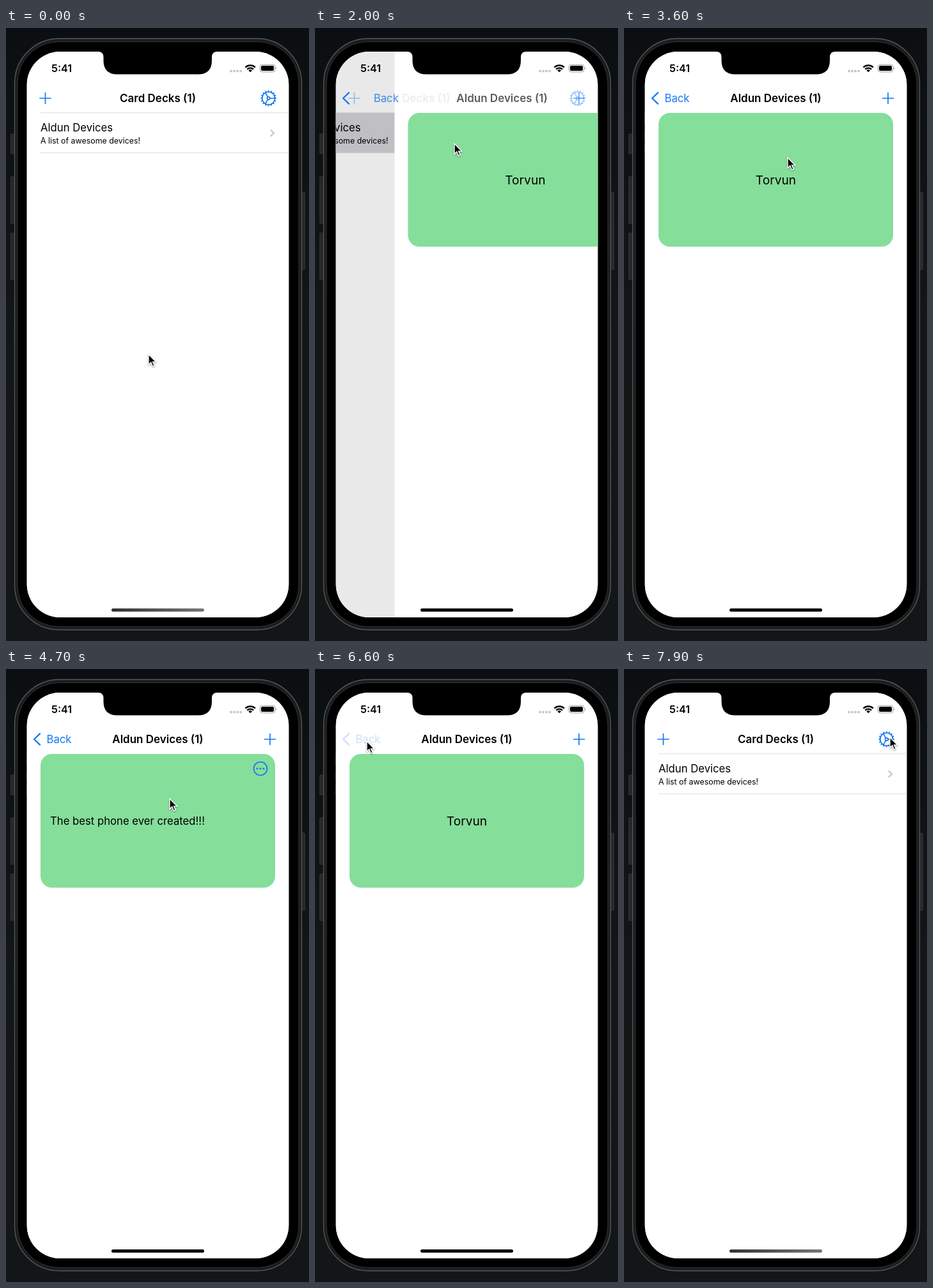
These frames come from a looping animation (474 by 960 pixels, 8000 ms). An HTML page:

```html
<!DOCTYPE html>
<html lang="en">
<head>
<meta charset="utf-8">
<title>Card decks</title>
<style>
html, body { margin: 0; width: 100%; height: 100%; overflow: hidden; background: #0d1012; }
#stage { position: relative; width: 474px; height: 960px; overflow: hidden; font: 16.7px Inter, "Liberation Sans", sans-serif; }
#stage div, #stage svg { position: absolute; left: 0; top: 0; }
svg { overflow: visible; }
.screen { width: 474px; height: 960px; background: #fff; clip-path: inset(37px 31.7px 37px 32.7px round 52px); }
#detail { left: 0; width: 474px; height: 960px; }
#detail::before { content: ""; position: absolute; left: 32.7px; width: 410px; height: 960px; background: #fff; }
#stage #card { left: 54px; top: 133px; }
.bold { font-weight: 600; font-size: 17px; }
.mid { text-anchor: middle; }
.blue { fill: none; stroke: #1578f3; stroke-width: 1.7; stroke-linecap: round; stroke-linejoin: round; }
.tint { fill: #1578f3; }
</style>
</head>
<body>
<div id="stage">
  <svg width="474" height="960">
    <defs>
      <linearGradient id="wall" x2="0" y2="1">
        <stop stop-color="#0b0f11"/><stop offset=".5" stop-color="#131617"/><stop offset="1" stop-color="#121617"/>
      </linearGradient>
      <linearGradient id="bar"><stop stop-color="#333"/><stop offset="1" stop-color="#777"/></linearGradient>
    </defs>
    <rect width="474" height="960" fill="url(#wall)"/>
    <g fill="#25282a" stroke="#383b3c" stroke-width=".8">
      <rect x="7.5" y="166" width="7" height="31" rx="1"/>
      <rect x="7.5" y="233" width="7" height="73" rx="1"/>
      <rect x="7.5" y="321" width="7" height="73" rx="1"/>
      <rect x="461" y="257" width="6.5" height="121" rx="1"/>
    </g>
    <rect x="13.5" y="16.5" width="449" height="926" rx="70" fill="#1b1c1d" stroke="#565859" stroke-width="1.3"/>
    <rect x="18" y="21.5" width="440" height="916" rx="65" fill="#000" stroke="#303233"/>
  </svg>

  <div class="screen">
    <svg id="list" width="474" height="960">
      <rect x="32" width="411" height="960" fill="#fff"/>
      <rect id="row" x="32" y="133" width="411" height="62.5" fill="#d1d1d6"/>
      <path d="M54 132.8H443M54 195.4H443" stroke="#dcdcde"/>
      <text x="54" y="161.5">Aldun Devices</text>
      <text x="54" y="181" font-size="12.4">A list of awesome devices!</text>
      <path d="M413.8 159.3l5.2 5.2-5.2 5.2" fill="none" stroke="#c3c3c6" stroke-width="2"/>
      <rect id="dim" x="32" width="540" height="960"/>
    </svg>

    <div id="detail">
      <svg id="card" width="367" height="209.5">
        <rect id="face" width="367" height="209.5" rx="18"/>
        <text id="front" class="mid" x="183.5" y="112" font-size="19.2">Torvun</text>
        <g id="back">
          <text x="15" y="111">The best phone ever created!!!</text>
          <circle cx="344" cy="23" r="10.5" class="blue"/>
          <g class="tint"><circle cx="339" cy="23" r="1.5"/><circle cx="344" cy="23" r="1.5"/><circle cx="349" cy="23" r="1.5"/></g>
        </g>
      </svg>
    </div>

    <svg width="474" height="960">
      <g id="oldIcons" class="blue">
        <path d="M53 110h17M61.5 101.5v17"/>
        <g id="gear" transform="translate(410.7 110)">
          <circle r="10"/><circle r="2.2"/>
        </g>
      </g>
      <text id="oldTitle" class="bold mid" x="237.5" y="116">Card Decks (1)</text>
      <path id="chevron" class="blue" d="M53 101.3l-9 8.7 9 8.7" style="stroke-width:2.3"/>
      <text id="backLabel" class="tint" x="63.5" y="116">Back</text>
      <text id="newTitle" class="bold mid" x="237.5" y="116">Aldun Devices (1)</text>
      <path id="newPlus" class="blue" d="M404.5 110h17M413 101.5v17"/>

      <path d="M144 37q8.500 0 8.500 8.500v5.500q0 21.500 21.500 21.500h126.500q21.500 0 21.500-21.500v-5.500q0-8.500 8.500-8.500z"/>
      <text x="71" y="69.3" class="bold" style="font-size:16.2px">5:41</text>
      <g fill="#c6c6c8"><circle cx="352" cy="67.5" r="1.9"/><circle cx="357" cy="67.5" r="1.9"/><circle cx="362" cy="67.5" r="1.9"/><circle cx="367" cy="67.5" r="1.9"/></g>
      <path d="M374.5 61.6a11 11 0 0 1 15.4 0M377.3 64.6a7 7 0 0 1 9.8 0" fill="none" stroke="#000" stroke-width="2.4"/>
      <path d="M382.2 69.3l-2.8-2.9a4 4 0 0 1 5.6 0z"/>
      <rect x="397.3" y="57.3" width="23.5" height="11.5" rx="3.4" fill="none" stroke="#999"/>
      <rect x="399" y="59" width="20" height="8" rx="2"/>
      <path d="M422 61q2.2 2 0 4z" fill="#999"/>
      <rect id="home" x="165" y="909" width="145" height="5" rx="2.5"/>
    </svg>
  </div>

  <svg id="pointer" width="16" height="24">
    <path d="M0 0v16.3l3.8-3.5 2.7 6.3 2.7-1.2-2.6-6h5.2z" stroke="#fff" stroke-width="1.4"
      style="filter:drop-shadow(0 1px 1px #0006)"/>
  </svg>
</div>

<script>
const LOOP = 8000, PUSH = 1845, POP = 6650, WIDTH = 410;
const $ = id => document.getElementById(id);
const clamp = v => Math.max(0, Math.min(1, v));
const smooth = v => v * v * (3 - 2 * v);
const ease = (t, start, length) => smooth(clamp((t - start) / length));

// Critically damped spring from 0 to 1
function spring(ms) {
  const x = Math.max(0, ms) * 0.01826;
  const rest = (1 + x) * Math.exp(-x);
  return rest < 0.001 ? 1 : 1 - rest;
}

// Pointer moves: start, length, x, y
const moves = [[200, 1300, 218, 181], [2600, 800, 256, 203], [5850, 650, 81, 113], [7250, 600, 416, 107]];

function pointerAt(t) {
  let x = 223, y = 511;
  for (const [start, length, toX, toY] of moves) {
    const k = ease(t, start, length);
    x += (toX - x) * k;
    y += (toY - y) * k;
  }
  return [x, y];
}

function shift(id, x, opacity) {
  $(id).style.transform = `translateX(${x}px)`;
  $(id).style.opacity = opacity;
}

function drawGear() {
  let d = "";
  const ray = (turn, from, to) => {
    const a = turn * 2 * Math.PI, c = Math.cos(a), s = Math.sin(a);
    d += `M${c * from} ${s * from}L${c * to} ${s * to}`;
  };
  for (let i = 0; i < 16; i++) ray(i / 16, 10.4, 11.8);
  for (let i = 0; i < 3; i++) ray(i / 3, 2.2, 10);
  const path = document.createElementNS("http://www.w3.org/2000/svg", "path");
  path.setAttribute("d", d);
  $("gear").append(path);
}

function drawCard(t) {
  const there = ease(t, 3800, 500), back = ease(t, 5216, 500);
  const turn = there < 1 ? -there : back;
  const showBack = there >= 0.5 && back < 0.5;
  const angle = turn * 180 - (Math.abs(turn) >= 0.5 ? Math.sign(turn) * 180 : 0);
  const depth = Math.abs(Math.sin(turn * Math.PI));
  $("card").style.transform = depth < 1e-6 ? "none"
    : `perspective(946px) translateZ(${-201 * depth}px) rotateY(${angle}deg)`;
  const shade = [134, 222, 155].map(c => Math.round(c + (106 - c) * 0.58 * depth));
  $("face").style.fill = `rgb(${shade})`;
  $("front").style.display = showBack ? "none" : "";
  $("back").style.display = showBack ? "" : "none";
  $("back").style.filter = depth < 1e-6 ? "none" : `brightness(${1 - 0.6 * depth})`;
}

function draw(t) {
  const p = t < POP ? spring(t - PUSH) : 1 - spring(t - POP);
  const rest = 1 - p;
  const pressed = t >= 6500 ? 0.22 : 1;

  shift("list", -123 * p, 1);
  $("dim").style.opacity = 0.11 * p;
  $("row").style.opacity = t < POP ? +(t >= 1700) : p;
  shift("detail", WIDTH * rest, 1);
  $("detail").style.visibility = p > 0 ? "visible" : "hidden";

  $("oldIcons").style.opacity = rest ** 0.6;
  shift("oldTitle", -110 * p, Math.max(0, 1 - 1.2 * p));
  shift("chevron", 0, Math.min(1, 1.3 * p) * pressed);
  shift("backLabel", 127 * rest, p * pressed);
  shift("newTitle", 247 * rest, p ** 1.8);
  shift("newPlus", 0, p ** 1.8);
  $("home").style.fill = p > 0 ? "#000" : "url(#bar)";

  drawCard(t);
  const [x, y] = pointerAt(t);
  $("pointer").style.transform = `translate(${x}px, ${y}px)`;
}

drawGear();
const begin = performance.now();
function tick() {
  draw((performance.now() - begin) % LOOP);
  requestAnimationFrame(tick);
}
tick();
</script>
</body>
</html>
```
